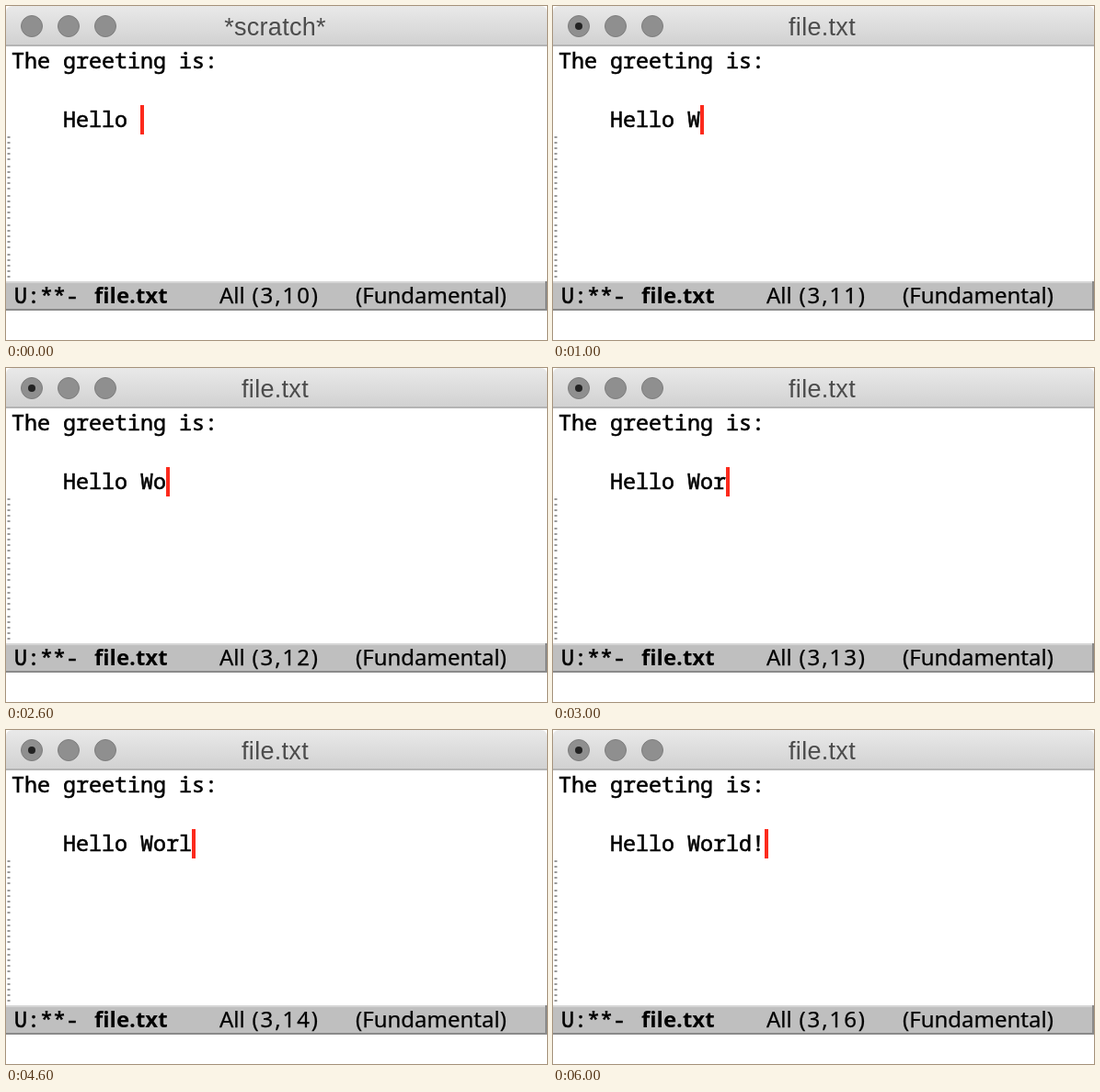
An HTML page for the animation above (7 s loop, 588x364 px).

```html
<!DOCTYPE html>
<html lang="en">
<meta charset="utf-8">
<title>Typing in an editor</title>
<style>
  html, body { margin: 0; width: 100%; height: 100%; overflow: hidden; background: #fff; }
  svg { display: block; }
  text { white-space: pre; }
  .mono { font: 23.33px "Noto Sans Mono", monospace; stroke: #000; stroke-width: .6px; }
  .sans { font: 24px "Noto Sans", sans-serif; stroke: #000; stroke-width: .25px; }
  .bold { font-weight: 700; stroke: none; }
  #title { font: 27px "Liberation Sans", Arial, sans-serif; letter-spacing: .3px; fill: #4c4c4c; text-anchor: middle; }
  #position { letter-spacing: 1.9px; }
</style>
<svg width="588" height="364" viewBox="0 0 588 364">
  <defs>
    <linearGradient id="bar" x2="0" y2="1">
      <stop stop-color="#e9e9e9"/>
      <stop offset="1" stop-color="#d1d1d1"/>
    </linearGradient>
  </defs>

  <path d="M0 43V7Q0 0 7 0H581Q588 0 588 7V43Z" fill="url(#bar)"/>
  <path d="M0 43H588" stroke="#b4b4b4" stroke-width="2"/>
  <g fill="#8f8f8f" stroke="#7d7d7d">
    <circle cx="28" cy="22" r="11.5"/>
    <circle cx="68" cy="22" r="11.5"/>
    <circle cx="108" cy="22" r="11.5"/>
  </g>
  <circle id="unsaved" cx="28" cy="22" r="4" fill="#222"/>
  <text id="title" x="292.5" y="32"></text>

  <text class="mono" x="6" y="68">The greeting is:</text>
  <text class="mono" x="62" y="132" id="line"></text>
  <rect id="cursor" y="108" width="4" height="32" fill="#fc2a1c"/>
  <path d="M3 142V299" stroke="#999" stroke-width="3" stroke-dasharray="2 4 2 4 2 4 2 4 2 6"/>

  <rect y="300" width="588" height="32" fill="#bfbfbf"/>
  <path d="M0 301H588" stroke="#d6d6d6" stroke-width="2"/>
  <path d="M0 331H587V300" fill="none" stroke="#8a8a8a" stroke-width="2"/>
  <text class="mono" x="9" y="324">U:<tspan class="bold">**</tspan>-</text>
  <text class="sans bold" x="96" y="324">file.txt</text>
  <text class="sans" x="232" y="324">All</text>
  <text class="sans" x="267.5" y="324" id="position"></text>
  <text class="sans" x="380" y="324">(Fundamental)</text>
</svg>
<script>
  const greeting = "Hello World!";
  const firstLength = 6, indent = 4, charWidth = 14, left = 6;
  const stepTime = 1000, steps = 7;
  const get = id => document.getElementById(id);
  let shown = -1;

  function draw(step) {
    const length = firstLength + step;
    const column = indent + length;
    get("line").textContent = greeting.slice(0, length);
    get("cursor").setAttribute("x", left + column * charWidth);
    get("position").textContent = `(3,${column})`;
    get("title").textContent = step ? "file.txt" : "*scratch*";
    get("unsaved").style.display = step ? "" : "none";
  }

  function tick() {
    const step = Math.floor(performance.now() / stepTime) % steps;
    if (step !== shown) draw(shown = step);
    requestAnimationFrame(tick);
  }
  tick();
</script>
</html>
```
